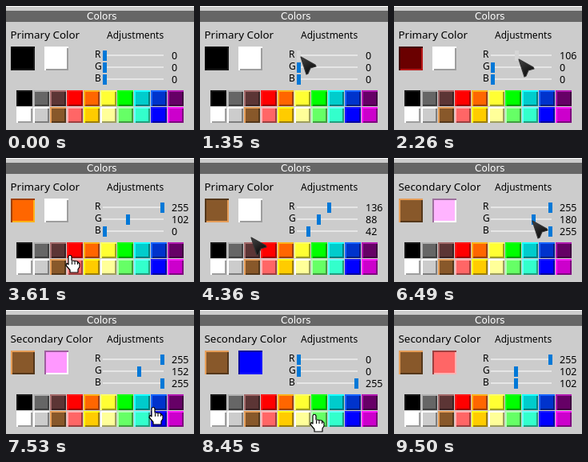
These frames come from a looping animation (235 px wide and 156 px high, 9960 ms). An HTML page with a canvas:

```html
<!DOCTYPE html>
<html lang="en">
<head>
<meta charset="utf-8">
<title>Colors</title>
<style>
html, body { margin: 0; width: 100%; height: 100%; overflow: hidden; background: #ccc; }
canvas { display: block; width: 235px; height: 156px; }
</style>
</head>
<body>
<canvas id="stage"></canvas>
<script>
const W = 235, H = 156, LOOP = 9960;
const FIRST = 278, STEP = 151, LAST_STEP = 61;
const canvas = document.getElementById('stage');
const ctx = canvas.getContext('2d');
const scale = window.devicePixelRatio || 1;
canvas.width = Math.round(W * scale);
canvas.height = Math.round(H * scale);

const PALETTE = [
  '#000 #666 #5c3535 #f00 #f60 #ff3 #0f0 #0cc #03c #606'.split(' '),
  '#fff #ccc #88582a #f66 #fc0 #ff9 #6f6 #3fc #00f #c0c'.split(' ')
];

const cell = (row, col) => ({ x: 13 + 21 * col, y: 106 + 21 * row });
const swatch = i => ({ x: 6 + 42 * i, y: 51 });
const handle = v => 123.3 + v / 255 * 72.5;
const inside = (o, dx = 14, dy = 14) => ({ x: o.x + dx, y: o.y + dy });

// Pointer stops: step reached, place, steps to rest there
const STOPS = [
  { at: 0, x: 133, y: 93 },
  { at: 7, x: 126, y: 64 },
  { at: 13, x: 156, y: 67 },
  { at: 20, ...inside(cell(0, 4), 11, 10) },
  { at: 22, ...inside(cell(0, 3), 4, 16) },
  { at: 24, ...inside(cell(1, 2), 10, 8) },
  { at: 30, ...inside(swatch(1)) },
  { at: 33, x: 138, y: 88 },
  { at: 35, x: 192, y: 80, rest: 1 },
  { at: 37, x: 195, y: 77 },
  { at: 41, x: 173, y: 79 },
  { at: 43, x: 165, y: 80, rest: 1 },
  { at: 49, ...inside(cell(1, 8), 8, 6) },
  { at: 52, x: 164, y: 132, rest: 1 },
  { at: 54, x: 143, y: 131 },
  { at: 57, ...inside(cell(1, 3), 11, 7) },
  { at: 60, x: 133, y: 148 }
];

// Clicks: step, what is done to the panel
const CLICKS = [
  { at: 20, pick: [0, 4] },
  { at: 24, pick: [1, 2] },
  { at: 30, select: 1 },
  { at: 49, pick: [1, 8] },
  { at: 57, pick: [1, 3] }
];

// Slider drags: first and last step, channel, where the handle is held
const DRAGS = [
  { from: 7, to: 13, channel: 0, grip: 2.7 },
  { from: 37, to: 43, channel: 1, grip: -1.5 }
];

const clamp = (v, a, b) => Math.max(a, Math.min(b, v));
const css = c => `rgb(${c.map(Math.round).join()})`;

function hexToRgb(hex) {
  const h = hex.length === 4 ? hex.replace(/\w/g, '$&$&') : hex;
  return [1, 3, 5].map(i => parseInt(h.slice(i, i + 2), 16));
}

function pointerAt(step) {
  const i = STOPS.findLastIndex(s => s.at <= step);
  const a = STOPS[i], b = STOPS[i + 1] || a;
  const start = a.at + (a.rest || 0);
  const k = clamp((step - start) / (b.at - start || 1), 0, 1);
  return { x: a.x + (b.x - a.x) * k, y: a.y + (b.y - a.y) * k };
}

function stateAt(step) {
  const colors = [[0, 0, 0], [255, 255, 255]];
  let active = 0;
  const events = [
    ...CLICKS, ...DRAGS.map(drag => ({ at: drag.from, drag }))
  ].sort((a, b) => a.at - b.at);
  for (const { at, pick, select, drag } of events) {
    if (at > step) break;
    if (pick) colors[active] = hexToRgb(PALETTE[pick[0]][pick[1]]);
    if (select) active = select;
    if (drag) {
      const x = pointerAt(Math.min(step, drag.to)).x - drag.grip;
      const v = (x - handle(0)) / (handle(255) - handle(0)) * 255;
      colors[active][drag.channel] = Math.round(clamp(v, 0, 255));
    }
  }
  return { colors, active };
}

function rect(x, y, w, h, fill) {
  ctx.fillStyle = fill;
  ctx.fillRect(x, y, w, h);
}

function label(str, x, y, size, fill = '#000', family = '"Noto Sans", "Open Sans"') {
  ctx.font = `${size}px ${family}, sans-serif`;
  ctx.fillStyle = fill;
  ctx.fillText(str, x, y);
}

function bevel({ x, y }, size, color, sunken) {
  const light = css(color.map(v => Math.min(255, v * 1.5 + 25)));
  const dark = css(color.map(v => v * 0.62));
  const edge = 2, end = size - edge;
  rect(x, y, size, size, sunken ? dark : light);
  rect(x + end, y + edge, edge, end, sunken ? light : dark);
  rect(x + edge, y + end, end, edge, sunken ? light : dark);
  rect(x + edge, y + edge, size - 2 * edge, size - 2 * edge, css(color));
}

function slider(name, y, value, held) {
  label(name, 111, y + 3, 12);
  rect(121, y - 1, 76, 2, '#e6e6e6');
  rect(Math.round(handle(value) - 2.5), y - 6, 5, 13, held ? '#d6d6d6' : '#0078d7');
  label(value, 207, y + 4.5, 12.5);
}

function shape(x, y, points, fill, line) {
  ctx.beginPath();
  points.forEach(([px, py]) => ctx.lineTo(x + px, y + py));
  ctx.closePath();
  ctx.lineJoin = 'round';
  ctx.lineWidth = 1.2;
  ctx.fillStyle = fill;
  ctx.strokeStyle = line;
  ctx.fill();
  ctx.stroke();
}

function arrow({ x, y }) {
  const g = ctx.createLinearGradient(x, y, x + 12, y + 18);
  g.addColorStop(0, '#444');
  g.addColorStop(1, '#111');
  shape(x, y, [[0, 0], [18, 10], [19, 12], [12, 14], [9, 21], [7, 22]], g, '#333');
}

function hand({ x, y }) {
  shape(x, y, [
    [-1, 0.5], [1, 0.5], [2, 2], [2, 7], [9, 8], [12, 11], [12, 15], [10, 18],
    [10, 22], [0, 22], [0, 19], [-5, 13], [-4, 10.5], [-2, 12], [-2, 2]
  ], '#fff', '#000');
  for (let dx = 2; dx < 10; dx += 3.5) rect(x + dx, y + 8, 1, 4, '#000');
}

function draw(step) {
  const { colors, active } = stateAt(step);
  ctx.setTransform(scale, 0, 0, scale, 0, 0);
  rect(0, 0, W, H, '#cccccc');
  rect(0, 0, W, 1, '#ffffff');
  rect(0, 6, W, 14, '#666666');
  label('Colors', 101, 17, 12, '#fff', '"DejaVu Sans"');
  label(active ? 'Secondary Color' : 'Primary Color', 5.5, 41, 13.4);
  label('Adjustments', 126, 41, 12);

  colors.forEach((c, i) => bevel(swatch(i), 30, c, i === active));
  [...'RGB'].forEach((name, i) =>
    slider(name, 62 + 15 * i, colors[active][i], i === 0 && step >= 7 && step <= 13));
  PALETTE.forEach((row, r) => row.forEach((c, i) =>
    bevel(cell(r, i), 20, hexToRgb(c), false)));

  if (step < 0 || step >= LAST_STEP) return;
  const p = pointerAt(step);
  p.x = Math.round(p.x);
  p.y = Math.round(p.y);
  const s = swatch(1);
  const overSwatch = p.x >= s.x && p.x < s.x + 30 && p.y >= s.y && p.y < s.y + 30;
  (p.y >= 106 || overSwatch ? hand : arrow)(p);
}

const began = performance.now();
function frame() {
  const t = (performance.now() - began) % LOOP;
  draw(Math.min(LAST_STEP, Math.floor((t - FIRST) / STEP)));
  requestAnimationFrame(frame);
}
frame();
</script>
</body>
</html>
```
